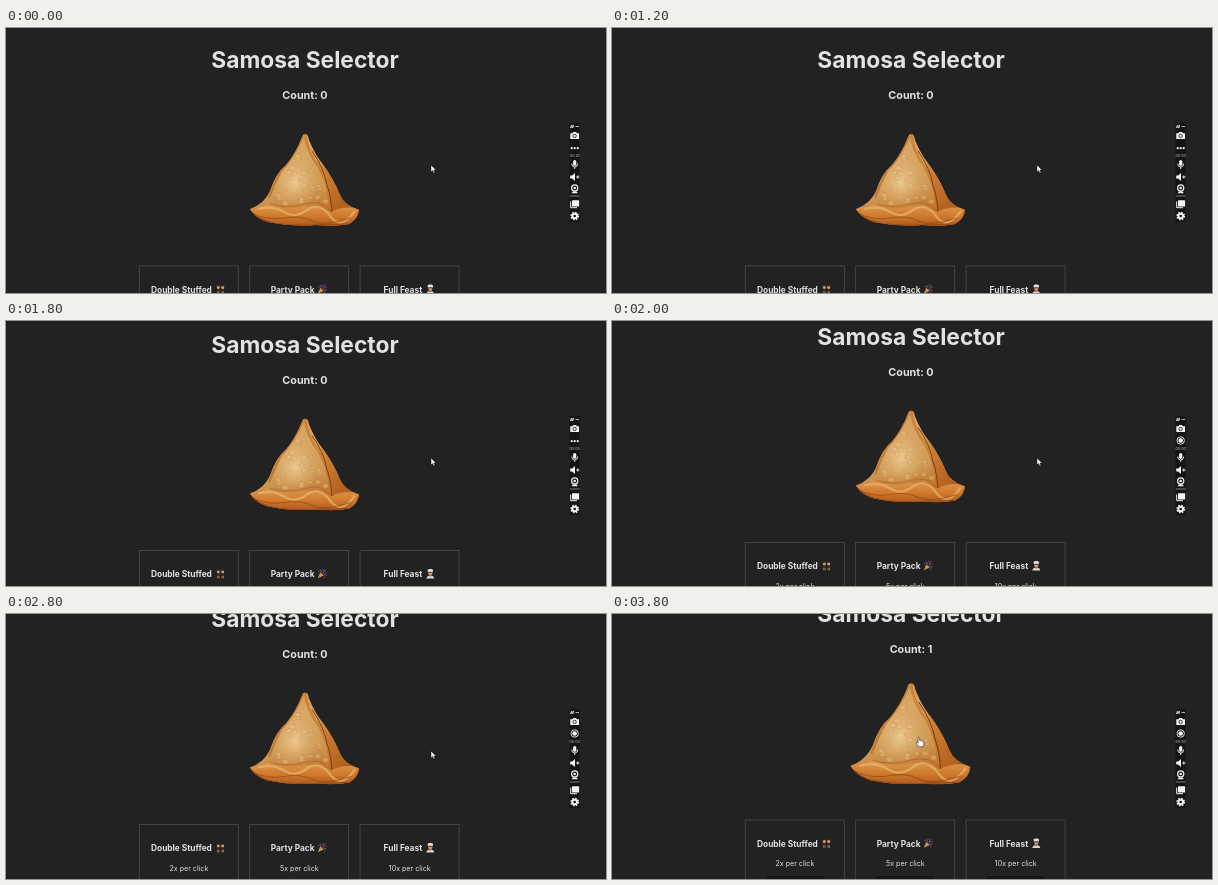
These frames come from a looping animation (600 px wide and 265 px high, 8 s). An HTML page:

```html
<!DOCTYPE html>
<html lang="en">
<head>
<meta charset="utf-8">
<title>Samosa Selector</title>
<style>
html, body { margin: 0; width: 100%; height: 100%; overflow: hidden; background: #232223; }
svg { display: block; width: 600px; height: 265px; font-family: Inter, "Liberation Sans", sans-serif; }
.page text { fill: #e2e2e2; }
.bold { font-weight: 700; }
.mid { text-anchor: middle; }
.card { fill: none; stroke: #4b4a4c; stroke-width: .8; }
</style>
</head>
<body>
<svg id="stage" viewBox="0 0 600 265">
  <defs>
    <linearGradient id="crust" x1="0" y1="0" x2=".25" y2="1">
      <stop offset="0" stop-color="#d69450"/>
      <stop offset=".35" stop-color="#d9a765"/>
      <stop offset=".68" stop-color="#cf9a55"/>
      <stop offset="1" stop-color="#bb6722"/>
    </linearGradient>
    <linearGradient id="side" x1="0" y1="0" x2=".6" y2="1">
      <stop offset="0" stop-color="#df9a52"/>
      <stop offset=".5" stop-color="#cb7c30"/>
      <stop offset="1" stop-color="#a9561a"/>
    </linearGradient>
    <linearGradient id="rim" x1="0" y1="0" x2="0" y2="1">
      <stop offset="0" stop-color="#dc9a50"/>
      <stop offset=".5" stop-color="#d07a2c"/>
      <stop offset="1" stop-color="#a65319"/>
    </linearGradient>
    <radialGradient id="glow">
      <stop offset="0" stop-color="#efd09a" stop-opacity=".85"/>
      <stop offset="1" stop-color="#e4b877" stop-opacity="0"/>
    </radialGradient>
    <clipPath id="body">
      <path d="M299 106Q302 106 303 112Q309 127 318 138Q328 152 334 167Q338 177 353 182Q352 191 343 196Q329 199 310 197Q287 199 262 194Q249 190 244 181Q258 176 264 163Q270 145 280 137Q290 125 296 109Q297 106 299 106Z"/>
    </clipPath>
  </defs>
  <rect width="600" height="265" fill="#232223"/>
  <g class="page" id="page">
    <text class="bold mid" x="299" y="40" font-size="22.8">Samosa Selector</text>
    <text class="bold mid" id="count" x="299" y="71" font-size="10.75">Count: 0</text>
    <g id="samosa">
      <g clip-path="url(#body)">
        <rect x="240" y="100" width="120" height="102" fill="url(#crust)"/>
        <ellipse cx="289" cy="154" rx="24" ry="28" fill="url(#glow)"/>
        <path d="M299 105L304 112Q317 136 321 154Q326 173 325 199H358V178L304 105Z" fill="url(#side)"/>
        <path d="M299 106Q301 124 313 139Q323 157 325 181" fill="none" stroke="#c6711f" stroke-width="2.6" opacity=".65"/>
        <path d="M306 123Q318 140 321 157Q326 170 326 192" fill="none" stroke="#7c3c12" stroke-width="1"/>
        <g id="blisters"></g>
        <path d="M297 108Q288 129 275 143Q268 156 263 170" fill="none" stroke="#bd6c25" stroke-width="2.4" opacity=".7"/>
        <path d="M242 181Q255 179 264 176Q279 183 296 179Q311 177 325 184Q338 177 356 181V200H242Z" fill="url(#rim)"/>
        <path d="M252 181Q267 177 278 184T301 182T324 188T349 183" fill="none" stroke="#eabb76" stroke-width="2.2" opacity=".65"/>
        <path d="M246 185Q261 193 278 190T306 193T345 190" fill="none" stroke="#8d4314" stroke-width="1" opacity=".65"/>
        <path d="M264 176Q280 181 298 176T325 183" fill="none" stroke="#a6571d" stroke-width=".8" opacity=".7"/>
        <path d="M244 182Q252 192 268 195T310 197T343 196T353 183" fill="none" stroke="#9d4816" stroke-width="1.2"/>
      </g>
    </g>
    <g id="cards"></g>
  </g>
  <g id="toolbar" fill="#f4f4f4" stroke="none">
    <rect x="563.5" y="95" width="10" height="99" fill="#151415"/>
    <path d="M564.5 100L566 96.8M566.3 100L567.8 96.8M564.5 98H568M564.2 99.2H567.7M569.5 98.5H573" fill="none" stroke="#ddd" stroke-width=".8"/>
    <path d="M564.3 105.3H566.4L567.3 103.9H570L570.9 105.3H573V111H564.3Z"/>
    <circle cx="568.6" cy="107.9" r="1.7" fill="#f4f4f4" stroke="#222" stroke-width=".9"/>
    <g id="dots"><circle cx="565.7" cy="120.2" r="1.1"/><circle cx="568.7" cy="120.2" r="1.1"/><circle cx="571.7" cy="120.2" r="1.1"/></g>
    <g id="record"><circle cx="568.7" cy="119.5" r="3.7" fill="none" stroke="#f4f4f4" stroke-width=".9"/><circle cx="568.7" cy="119.5" r="2.3"/></g>
    <text class="mid" id="clock" x="568.7" y="128.8" font-size="3.7" fill="#ccc">00:21</text>
    <rect x="567.1" y="132" width="3.2" height="5.8" rx="1.6"/>
    <path d="M565.7 135.5Q565.7 139 568.7 139T571.7 135.5M568.7 139V141" fill="none" stroke="#f4f4f4" stroke-width=".9"/>
    <path d="M564.2 147.4H566.2L569 145V153L566.2 150.6H564.2Z"/>
    <path d="M570.2 149H573.4M571.8 147.4V150.6" stroke="#f4f4f4" stroke-width=".9"/>
    <circle cx="568.7" cy="160" r="3.1" fill="none" stroke="#f4f4f4" stroke-width="1.2"/>
    <circle cx="568.7" cy="160" r="1.3"/>
    <path d="M565.5 165.2L567 163.5H570.4L572 165.2Z"/>
    <path d="M563.8 168H573.6" stroke="#aaa" stroke-width=".7"/>
    <path d="M564.7 173.5V179.7H571" fill="none" stroke="#f4f4f4" stroke-width="1"/>
    <rect x="566" y="172.2" width="7.1" height="6.3" rx=".6"/>
    <circle cx="568.7" cy="188" r="3.6" fill="none" stroke="#f4f4f4" stroke-width="1.6" stroke-dasharray="1.5 1.33"/>
    <circle cx="568.7" cy="188" r="2.3" fill="none" stroke="#f4f4f4" stroke-width="2"/>
  </g>
  <path id="arrow" d="M0 0V7L1.6 5.6L2.7 8L3.9 7.4L2.9 5.1H5Z" fill="#fff" stroke="#111" stroke-width=".5"/>
  <path id="hand" d="M-1.9 -4.2Q-1 -5.2 -.3 -4.2V-1.5Q1 -2 1.5 -1.1Q2.5 -1.4 2.8 -.5Q3.8 -.5 3.8 .7V2.3L2.9 4.8H-1.4L-3.7 1.4Q-4 .2 -2.9 .3L-1.9 1.2Z" fill="#fff" stroke="#222" stroke-width=".6"/>
</svg>
<script>
const LOOP = 8000, STEP = 100;
const $ = id => document.getElementById(id);

const dancer = x => `<path d="M${x - 1.2} -4.5V-2.5M${x + 1.2} -4.5V-2.5" stroke="#4a332a"/>
  <circle cx="${x}" cy="-1.8" r="1.5" fill="#d5a052"/><path d="M${x - 1.2} -.3H${x + 1.2}L${x + .8} 2H${x - .8}Z" fill="#3c2a28"/>
  <path d="M${x - .6} 2V4.5M${x + .7} 2V4.5" stroke="#c08a50"/>`;
const emoji = {
  dancers: dancer(-2.2) + dancer(2.2),
  popper: `<path d="M-4.2 4.4L-1.7 -1.6L1.7 1.8Z" fill="#c39a4d"/>
    <path d="M-.8 -1.5Q-.5 -3 -1.6 -4.2M1 0Q1 -3 3.6 -4M1.6 1.2Q3 .2 4.3 1.3" fill="none" stroke="#8a62b5"/>
    <path d="M.6 -4.2h1M3.5 -1.6h1M2.2 3.4h1M-3.6 -2.6h1" stroke="#d0607c"/>`,
  cook: `<path d="M-2.3 -1.6L-2.8 -3.6Q-2 -5 0 -4.7Q2 -5 2.8 -3.6L2.3 -1.6Z" fill="#e4e1df"/>
    <circle cx="0" cy="-.3" r="2.1" fill="#c9946b"/><path d="M-2.1 -1.5H2.1" stroke="#59392c"/>
    <path d="M-4 4.6Q-3.5 1.7 0 1.7T4 4.6Z" fill="#d9d5d3"/><path d="M-1.2 1.8H1.2L0 3Z" fill="#b5443c"/>`
};

const cards = [
  [133.3, 145, "Double Stuffed", 214.5, "dancers", 2],
  [243.7, 264.7, "Party Pack", 316, "popper", 5],
  [354.1, 377.6, "Full Feast", 424.3, "cook", 10]
];
$("cards").innerHTML = cards.map(([x, textX, name, iconX, icon, rate]) => `
  <rect class="card" x="${x}" y="237.9" width="99" height="110"/>
  <text class="bold" x="${textX}" y="264.5" font-size="8.35">${name}</text>
  <g transform="translate(${iconX} 261.3)" stroke-width=".9">${emoji[icon]}</g>
  <text class="mid" x="${x + 49.6}" y="284" font-size="7.1">${rate}x per click</text>
  <rect x="${x + 20}" y="294.3" width="59" height="18" rx="3" fill="#171617"/>`).join("");

// Fried bubbles, scattered over the front face
let seed = 17;
const random = () => (seed = seed * 16807 % 2147483647) / 2147483647;
$("blisters").innerHTML = Array.from({ length: 34 }, () => {
  const y = 128 + 48 * Math.sqrt(random());
  const x = 297 + (random() - .55) * (y - 106) * .75;
  const r = .9 + random() * 2.1;
  return `<ellipse cx="${x}" cy="${y}" rx="${r}" ry="${r * .8}" fill="#edcb91" fill-opacity=".38" stroke="#ad692b" stroke-opacity=".38" stroke-width=".5"/>`;
}).join("");

// Linear interpolation through [time, value] keys
function track(keys, t) {
  const next = keys.findIndex(key => key[0] > t);
  if (next < 0) return keys[keys.length - 1][1];
  if (next === 0) return keys[0][1];
  const [t0, a] = keys[next - 1], [t1, b] = keys[next];
  return a + (b - a) * (t - t0) / (t1 - t0);
}

const scroll = [[1500, 0], [1600, -1], [1800, -8.5], [2000, -16.5], [2200, -22], [2400, -25.5], [2600, -27.4], [2800, -27.5], [3000, -30.5], [3200, -32]];
const scale = [[3200, 1], [3300, 1.05], [3400, 1.1], [3500, 1.1], [3600, 1.06], [3700, 1.06], [3800, 1.1]];
const mouseX = [[2800, 425], [2900, 408], [3000, 370], [3100, 328], [3200, 308]];
const mouseY = [[2800, 137], [3000, 134], [3200, 128]];
const show = (id, on) => $(id).setAttribute("visibility", on ? "visible" : "hidden");
const move = (id, transform) => $(id).setAttribute("transform", transform);

function draw(time) {
  const t = Math.floor(time % LOOP / STEP) * STEP;
  move("page", `translate(0 ${track(scroll, t)})`);
  move("samosa", `translate(299 152.5) scale(${track(scale, t)}) translate(-299 -152.5)`);
  $("count").textContent = `Count: ${t >= 3700 ? 1 : 0}`;
  $("clock").textContent = t < 300 ? "00:21" : "00:00";
  show("dots", t < 1900);
  show("record", t >= 1900);
  const hovering = t >= 3200;
  const at = `translate(${track(mouseX, t)} ${track(mouseY, t)})`;
  move("arrow", at);
  move("hand", at);
  show("arrow", !hovering);
  show("hand", hovering);
}

const start = performance.now();
function tick() {
  draw(performance.now() - start);
  requestAnimationFrame(tick);
}
tick();
</script>
</body>
</html>
```
